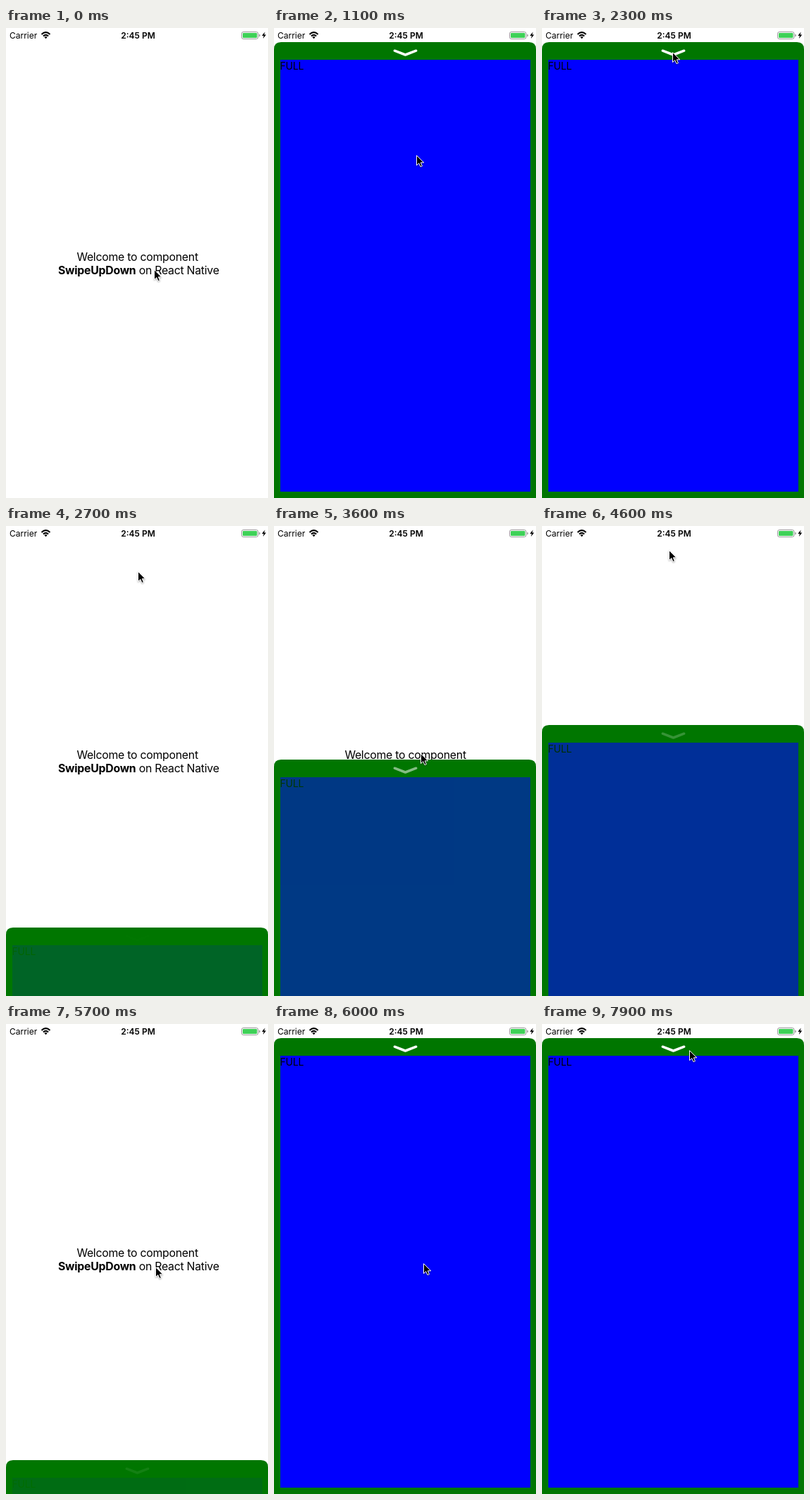
These frames come from a looping animation (372x666 px, 8000 ms). An HTML page:

```html
<!DOCTYPE html>
<html lang="en">
<head>
<meta charset="utf-8">
<title>Swipe up and down</title>
<style>
  html, body { margin: 0; width: 100%; height: 100%; overflow: hidden; background: #fff; }
  svg { display: block; width: 100%; height: 100%; }
  text { font-family: Inter, Roboto, "Liberation Sans", sans-serif; fill: #000; white-space: pre; }
  .status { font-size: 12px; }
  .body { font-size: 15.8px; letter-spacing: -0.24px; }
  .full { font-size: 13.9px; letter-spacing: -0.2px; }
  #cursor { filter: drop-shadow(0 1px 1px rgba(0, 0, 0, .35)); }
</style>
</head>
<body>
<svg viewBox="0 0 372 666">
  <rect width="372" height="666" fill="#fff"/>

  <text class="body" x="186.6" y="329.6" text-anchor="middle">Welcome to component</text>
  <text class="body" x="74" y="348.6"><tspan font-weight="700">SwipeUpDown</tspan> on React Native</text>

  <g id="panel">
    <path d="M0 700V10Q0 0 10 0H362Q372 0 372 10V700Z" fill="#007600"/>
    <g id="content">
      <rect x="9" y="25" width="355" height="612" fill="#00f"/>
      <text class="full" x="8.6" y="38.9">FULL</text>
    </g>
    <path id="chevron" d="M171.3 12.2L186.5 18L201.7 12.2" fill="none" stroke="#fff"
      stroke-width="3.5" stroke-linecap="round" stroke-linejoin="round"/>
  </g>

  <g>
    <text class="status" x="5" y="14.5">Carrier</text>
    <g fill="none" stroke="#000" stroke-width="2.1">
      <path d="M50.5 9Q56.5 3.4 62.5 9"/>
      <path d="M52.9 11.6Q56.5 8.2 60.1 11.6"/>
    </g>
    <path d="M54.4 12.9Q56.5 11.2 58.6 12.9L56.5 15.2Z"/>
    <text class="status" x="187.5" y="14.5" text-anchor="middle" font-weight="600">2:45 PM</text>
    <rect x="334.5" y="5.5" width="23.5" height="10" rx="2.6" fill="#fff" stroke="#999"/>
    <rect x="336" y="7" width="20.5" height="7" rx="1.3" fill="#3fd158"/>
    <path d="M359.3 8.6Q361 9 361 10.5T359.3 12.4Z" fill="#999"/>
    <path d="M367.6 5.6L363.3 11H365.9L364.9 15L369.3 9.4H366.6Z"/>
  </g>

  <g id="cursor">
    <path d="M.5 .6V14.6L3.8 11.6L6 16.6L8.4 15.6L6.3 10.8H10.7Z" stroke="#fff"/>
  </g>
</svg>
<script>
const LOOP = 8000, STEP = 100;
const OPEN_Y = 20, CLOSED_Y = 666, SLIDE = 300;

// Start times of the panel's slides: up, down, up, ...
const slides = [800, 2473.4, 3446.2, 4469, 5650];

// Where the pointer rests first, then each move it makes.
const rest = { x: 210, y: 342 };
const moves = [
  { from: 800, to: 1370, x: 195, y: 42 },
  { from: 2100, to: 2300, x: 185, y: 34 },
  { from: 2580, to: 3200, x: 210, y: 342 },
  { from: 3490, to: 4200, x: 180, y: 30 },
  { from: 4550, to: 5300, x: 212, y: 344 },
  { from: 5950, to: 6600, x: 183, y: 34 },
  { from: 6900, to: 7000, x: 177, y: 33 },
  { from: 7800, to: 7900, x: 209, y: 37 }
];

const [panel, content, chevron, cursor] =
  ["panel", "content", "chevron", "cursor"].map(id => document.getElementById(id));
const mix = (a, b, k) => a + (b - a) * k;
const place = (el, x, y) => el.setAttribute("transform", `translate(${x} ${y})`);

// Eased progress from 0 to 1 between two times.
function progress(t, from, to) {
  const k = Math.min(1, Math.max(0, (t - from) / (to - from)));
  return k * k * (3 - 2 * k);
}

function draw(t) {
  let shown = 0;
  slides.forEach((start, i) => {
    const up = i % 2 === 0;
    shown = mix(shown, up ? 1 : 0, progress(t, start, start + SLIDE));
  });
  const opening = slides.filter(start => start <= t).length % 2 === 1;

  place(panel, 0, Math.round(mix(CLOSED_Y, OPEN_Y, shown)));
  content.setAttribute("opacity", shown);
  // The handle fades faster on the way down.
  chevron.setAttribute("opacity", opening ? shown : shown ** 3);

  let { x, y } = rest;
  for (const move of moves) {
    const k = progress(t, move.from, move.to);
    x = mix(x, move.x, k);
    y = mix(y, move.y, k);
  }
  place(cursor, Math.round(x), Math.round(y));
}

// The picture advances ten times a second.
function tick() {
  draw(Math.floor(performance.now() % LOOP / STEP) * STEP);
  requestAnimationFrame(tick);
}
tick();
</script>
</body>
</html>
```
